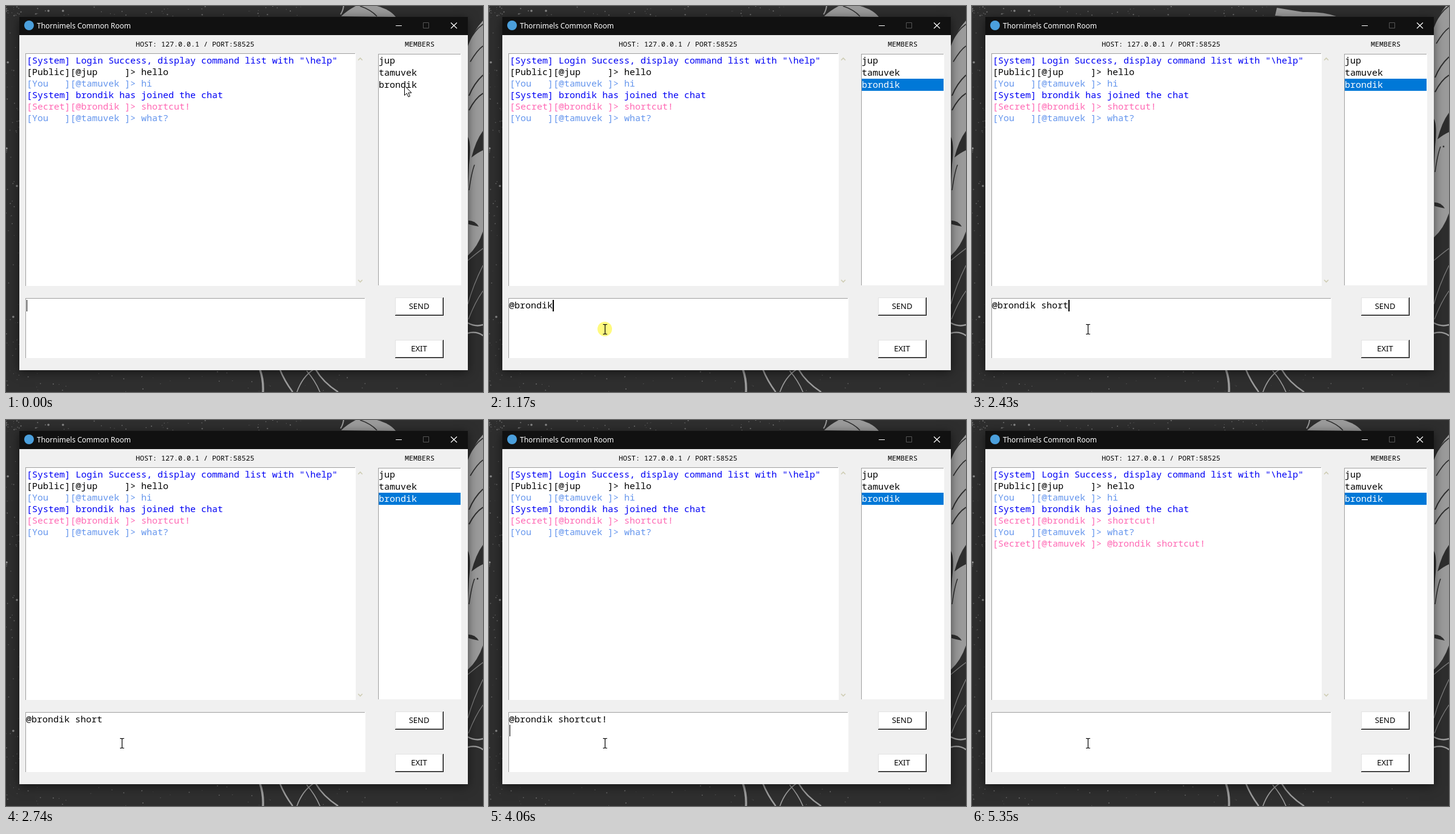
Animation, 787 px wide and 637 px high, one loop 5430 ms. Source, as an HTML page with a canvas:

```html
<!DOCTYPE html>
<html lang="en">
<head>
<meta charset="utf-8">
<title>Chat room</title>
<style>
  html, body { margin: 0; width: 100%; height: 100%; overflow: hidden; background: #2e2e2e; }
  canvas { display: block; }
</style>
</head>
<body>
<canvas id="stage" width="787" height="637"></canvas>
<script>
const W = 787, H = 637, LOOP = 5430;
const ctx = document.getElementById('stage').getContext('2d');
const MONO = '15px "Noto Sans Mono", monospace';
const SMALL = '11.667px "Noto Sans Mono", monospace';
const BLUE = '#0000f5', SKY = '#6495ed', PINK = '#ff69b4';
const GRAY = '#9b9b9b', DARK = '#2e2e2e';

const A = 'jup', B = 'tamuvek', C = 'brondik';
const members = [A, B, C];
const message = '@' + C + ' shortcut!';
const tag = (kind, who) => `[${kind.padEnd(6)}][@${who.padEnd(8)}]> `;
const chat = [
  [BLUE, '[System] Login Success, display command list with "\\help"'],
  ['#000', tag('Public', A) + 'hello'],
  [SKY, tag('You', B) + 'hi'],
  [BLUE, `[System] ${C} has joined the chat`],
  [PINK, tag('Secret', C) + 'shortcut!'],
  [SKY, tag('You', B) + 'what?'],
  [PINK, tag('Secret', B) + message]
];

const SELECT = 310, MENTION = 460, FOCUS = 1140, ENTER = 4060, SENT = 4140;
// key times for " shortcut!"
const keys = [1480, 1800, 1900, 2040, 2120, 2200, 3060, 3200, 3600, 3800];

function rect(x, y, w, h, color) {
  ctx.fillStyle = color;
  ctx.fillRect(x, y, w, h);
}

function text(str, x, y, font, color, align = 'left') {
  ctx.font = font;
  ctx.fillStyle = color;
  ctx.textAlign = align;
  ctx.fillText(str, x, y);
}

function stroke(d, color, width = 1) {
  ctx.strokeStyle = color;
  ctx.lineWidth = width;
  ctx.stroke(new Path2D(d));
}

function fill(d, color) {
  ctx.fillStyle = color;
  ctx.fill(new Path2D(d));
}

function disc(x, y, r, color) {
  ctx.fillStyle = color;
  ctx.beginPath();
  ctx.arc(x, y, r, 0, 7);
  ctx.fill();
}

function speckles() {
  let seed = 41;
  const rnd = () => (seed = seed * 16807 % 2147483647) / 2147483647;
  for (let i = 0; i < 60; i++) {
    const x = rnd() * 500, y = rnd() * 17;
    disc(x * x / 500, y, 0.4 + rnd() * 0.8, '#707070');
  }
  for (let i = 0; i < 70; i++) {
    disc(rnd() * 22, rnd() * H, 0.3 + rnd() * 0.7, '#646464');
  }
  for (let i = 0; i < 45; i++) {
    disc(rnd() * 760, 603 + rnd() * 34, 0.3 + rnd() * 0.8, '#666');
  }
  [[1, 235], [18, 297], [12, 513], [94, 8], [3, 93], [70, 8]]
    .forEach(([x, y]) => disc(x, y, 1.8, '#8a8a8a'));
}

function wallpaper(t) {
  const tilted = t >= 2280 && t < 2520;
  rect(0, 0, W, H, DARK);
  speckles();

  if (tilted) {
    fill('M503 3L546 10Q580 9 601 17L513 17L500 16Z', GRAY);
  } else {
    fill('M553 17Q562 8 577 0L612 0Q634 6 643 18Z', GRAY);
    stroke('M557 0Q556 8 552 14', GRAY, 2);
    stroke('M584 0Q602 6 612 17', DARK, 1.5);
  }

  // right-hand backdrop, raised while tilted
  ctx.save();
  ctx.translate(0, tilted ? -30 : 0);
  fill('M762 66Q772 40 787 24L787 372Q778 398 762 412Z', GRAY);
  stroke('M763 60Q773 40 787 30M766 92Q778 72 787 66', DARK, 1.6);
  stroke('M764 148Q772 128 787 114M764 172Q774 152 787 144', DARK, 2);
  fill('M787 206Q775 222 768 250Q778 242 787 238Z', DARK);
  fill('M762 216Q768 226 764 262L762 300Z', DARK);
  stroke('M764 304Q768 275 773 262', DARK, 1.5);
  fill('M763 354Q774 354 780 364Q770 362 763 360Z', DARK);
  if (t >= 1700 && t < 3440) disc(778, 262, 1.4, DARK);
  ctx.restore();

  stroke('M762 420Q776 408 787 400', '#777', 1.5);
  stroke('M762 492Q771 460 787 428M763 517Q774 488 787 470', '#858585', 1.2);
  stroke('M762 523Q775 530 787 526M762 540Q776 536 787 544', GRAY, 2.4);

  // lower strands
  stroke('M419 600Q425 617 424 637', GRAY, 3.5);
  stroke('M452 600Q459 618 473 637M511 600Q523 621 548 637', GRAY, 2.5);
  stroke('M507 600Q489 612 480 637M496 602Q510 618 518 637', GRAY, 1.6);
}

function field(x, y, w, h) {
  rect(x, y, w, h, '#fff');
  rect(x, y, w - 1, 1, '#a0a0a0');
  rect(x, y, 1, h, '#a0a0a0');
}

function button(y, label) {
  rect(642, y, 80, 30, '#000');
  rect(642, y, 79, 29, '#e3e3e3');
  rect(643, y + 1, 78, 28, '#999');
  rect(643, y + 1, 77, 27, '#fff');
  text(label, 681.5, y + 19, '13px "Noto Sans", sans-serif', '#000', 'center');
}

function frame() {
  ctx.save();
  ctx.shadowColor = 'rgba(0,0,0,.55)';
  ctx.shadowBlur = 16;
  ctx.shadowOffsetY = 3;
  rect(22, 18, 740, 583, '#f0f0f0');
  ctx.restore();
  rect(22, 18, 740, 30, '#111');
  disc(38, 32, 8, '#4b9fdc');
  text('Thornimels Common Room', 51, 37, '12px "Noto Sans", sans-serif', '#fff');
  rect(643, 32, 10, 1, '#fff');
  stroke('M688.5 27.5h9v9h-9z', '#555');
  stroke('M734 27.5l10 9.5M744 27.5l-10 9.5', '#fff', 1.2);
  text('HOST: 127.0.0.1 / PORT:58525', 214, 67, SMALL, '#000');
  text('MEMBERS', 658, 67, SMALL, '#000');
  field(32, 78, 545, 384);
  field(32, 482, 561, 99);
  stroke('M581 89.5l3.5 -3.5l3.5 3.5M581 452l3.5 3.5l3.5 -3.5', '#cfcdb4', 1.6);
  button(481, 'SEND');
  button(551, 'EXIT');
}

function memberList(t) {
  const active = t >= SELECT && t < FOCUS;
  if (active) rect(613, 78, 139, 384, '#646464');
  field(614, 79, 137, 382);
  members.forEach((name, i) => {
    const y = 95 + i * 20, chosen = i === 2 && t >= SELECT;
    if (chosen) rect(615, y - 15, 135, 20, '#0078d7');
    text(name, 615, y, MONO, chosen ? '#fff' : '#000');
    if (chosen && active) rect(615, y + 1, 63, 1, '#fff');
  });
}

function entry(t) {
  let str = '';
  if (t >= MENTION && t < SENT) {
    const typed = keys.filter(k => t >= k).length;
    str = message.slice(0, C.length + 1 + typed);
  }
  text(str, 33, 499, MONO, '#000');

  const on = t < SELECT || (t >= FOCUS && (t - FOCUS) % 900 < 600);
  if (!on) return;
  const row = t >= ENTER && t < SENT ? 1 : 0;
  const col = row ? 0 : str.length;
  rect(col ? 33 + col * 9 : 34, 485 + row * 18, col ? 2 : 1, 19, '#000');
}

function pointer(t) {
  const p = Math.min(1, Math.max(0, (t - 660) / 400));
  const e = p * p * (3 - 2 * p);
  const x0 = t < SELECT ? 657 : 656;
  const x = Math.round(x0 + (191 - x0) * e);
  const y = Math.round(132 + (533 - 132) * e);
  if ((t >= SELECT && t < 620) || (t >= FOCUS && t < 1220)) {
    disc(x, y, 12, 'rgba(255,245,0,.5)');
  }
  const inside = (l, top, r, b) => x > l && x < r && y > top && y < b;
  if (inside(32, 482, 593, 581) || inside(32, 78, 577, 462)) {
    stroke(`M${x - 3} ${y - 7.5}h2.5l1 1l1 -1h2.5M${x + .5} ${y - 7}v15M${x - 3} ${y + 8.5}h2.5l1 -1l1 1h2.5`, '#000', 1.2);
  } else {
    ctx.save();
    ctx.translate(x + .5, y - .5);
    const arrow = 'M0 0V16L3.7 12.6L6.5 18.5L9 17.4L6.3 11.7H11.5Z';
    fill(arrow, '#fff');
    stroke(arrow, '#000');
    ctx.restore();
  }
}

function draw(t) {
  wallpaper(t);
  frame();
  chat.slice(0, t >= SENT ? 7 : 6)
    .forEach(([color, line], i) => text(line, 34, 95 + i * 19, MONO, color));
  memberList(t);
  entry(t);
  pointer(t);
}

const start = performance.now();
function tick() {
  draw((performance.now() - start) % LOOP);
  requestAnimationFrame(tick);
}
tick();
</script>
</body>
</html>
```
